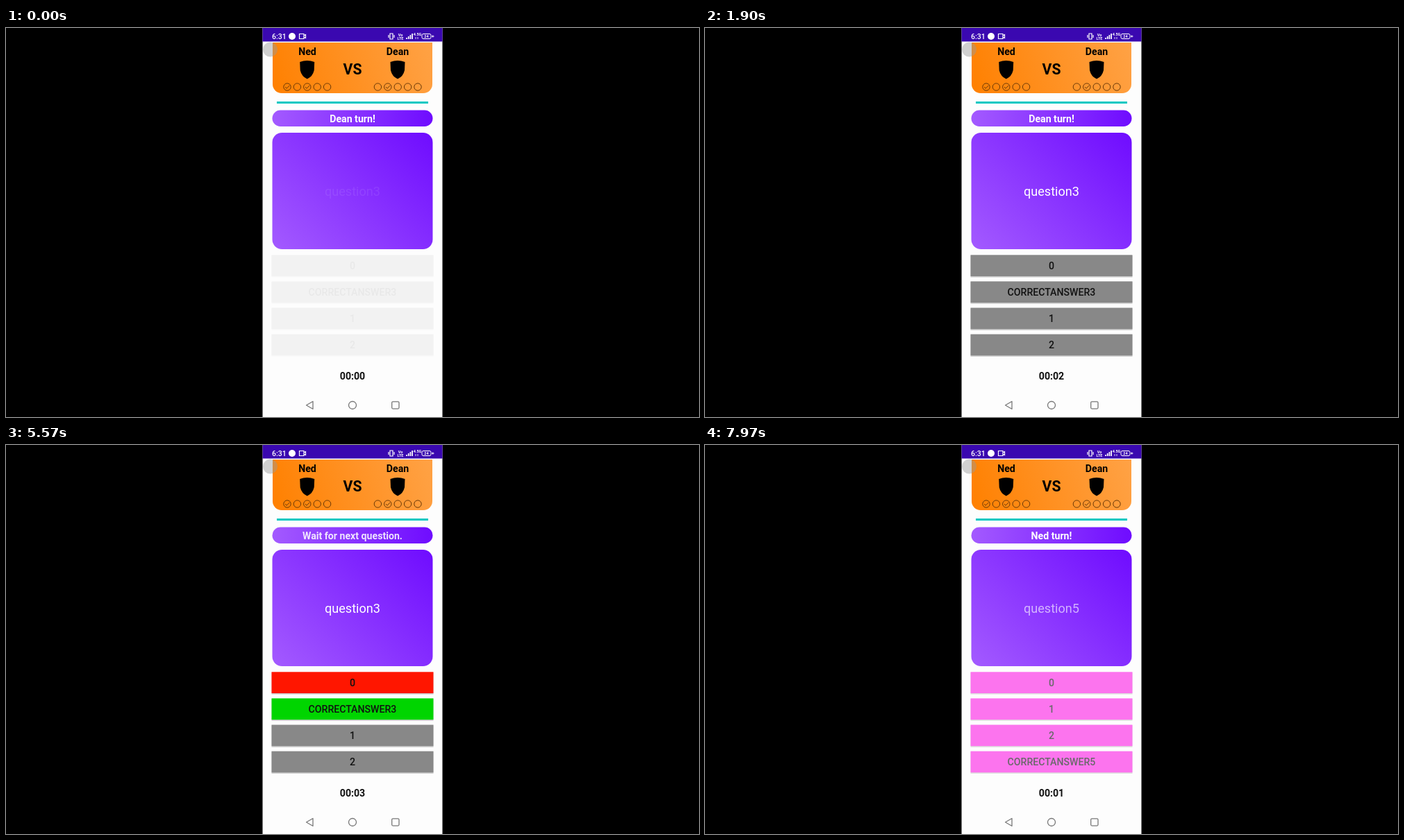
These frames come from a looping animation (998x561 px, 8000 ms). An HTML page:

```html
<!DOCTYPE html>
<html lang="en">
<head>
<meta charset="utf-8">
<title>Quiz duel</title>
<style>
  html, body { margin: 0; width: 100%; height: 100%; overflow: hidden; background: #000; }
  svg { display: block; width: 998px; height: 561px; }
  text { font-family: Roboto, sans-serif; font-size: 14.15px; text-anchor: middle; }
  .bold { font-weight: 700; }
  .tiny { font-size: 5.5px; font-weight: 700; fill: #fff; }
  .answer text { font-weight: 500; fill: #111; }
  .line { fill: none; stroke: #fff; stroke-width: 1.2; }
  .nav { fill: none; stroke: #777; stroke-width: 1.3; stroke-linejoin: round; }
  .score { fill: none; stroke: #6b3a08; stroke-width: 1; }
</style>
</head>
<body>
<svg viewBox="0 0 998 561">
  <defs>
    <linearGradient id="orange" gradientUnits="userSpaceOnUse" x1="384" y1="94" x2="614" y2="21">
      <stop stop-color="#ff8000"/><stop offset="1" stop-color="#ffa245"/>
    </linearGradient>
    <linearGradient id="pillFill">
      <stop stop-color="#a35aff"/><stop offset="1" stop-color="#6f0cff"/>
    </linearGradient>
    <linearGradient id="cardFill" gradientUnits="userSpaceOnUse" x1="400" y1="334" x2="598" y2="136">
      <stop stop-color="#a35aff"/><stop offset="1" stop-color="#6f0cff"/>
    </linearGradient>
    <path id="face" d="M-10.5-11Q0-15 10.5-11L10 1Q8 10 0 13.5Q-8 10-10 1Z"/>
  </defs>

  <rect x="369.5" width="259" height="561" fill="#fdfdfd"/>

  <!-- status bar -->
  <rect x="369.5" width="259" height="19.5" fill="#3a08b0"/>
  <text x="393.3" y="15.6" fill="#fff" style="font-size:10.5px;font-weight:500">6:31</text>
  <circle cx="412" cy="12" r="5" fill="#fff"/>
  <path class="line" d="M422.5 8.5h6.5v7h-6.5zM429 11l2.5-1.5v5L429 13"/>
  <path class="line" d="M553 8h4v8h-4zM551 10v4M559 10v4"/>
  <text class="tiny" x="568" y="11.5">Vo</text>
  <text class="tiny" x="568" y="16.5">LTE</text>
  <path class="line" style="stroke-width:1.7" d="M577 16v-2M579.7 16v-4M582.4 16v-6M585.1 16v-8"/>
  <text class="tiny" x="592.5" y="11">4.5G</text>
  <path class="line" style="stroke-width:.8" d="M590 13v3M593 13v3"/>
  <rect class="line" x="599" y="8.5" width="13" height="7" rx="2" style="stroke-width:1"/>
  <text class="tiny" x="605.5" y="14">24</text>
  <path class="line" style="stroke-width:1" d="M613 12h3.5M614.7 10.5v3"/>

  <!-- players -->
  <path d="M384 21H614V81a13 13 0 0 1-13 13H397a13 13 0 0 1-13-13Z" fill="url(#orange)"/>
  <text class="bold" x="434" y="38.5">Ned</text>
  <text class="bold" x="564" y="38.5">Dean</text>
  <use href="#face" x="433.7" y="60"/>
  <use href="#face" x="564" y="60"/>
  <text class="bold" x="499" y="66.5" style="font-size:21.2px">VS</text>
  <g id="scores"></g>
  <circle cx="380.5" cy="31" r="10.5" fill="#999" opacity=".45"/>
  <rect x="390" y="106" width="218" height="3" fill="#04c8c2"/>

  <!-- turn and question -->
  <rect x="383.5" y="118.5" width="231" height="23.5" rx="11.7" fill="url(#pillFill)"/>
  <text id="turn" class="bold" x="499" y="136" fill="#fff"></text>
  <rect x="383.5" y="151" width="231" height="168" rx="14" fill="url(#cardFill)"/>
  <text id="question" x="499" y="242.3" fill="#fff" style="font-size:18.1px"></text>
  <g id="answers"></g>
  <text id="timer" class="bold" x="499" y="507" fill="#111"></text>

  <!-- navigation bar -->
  <path class="nav" d="M442 538.5v11l-9.5-5.5z"/>
  <circle class="nav" cx="499" cy="544" r="5.5"/>
  <rect class="nav" x="555.7" y="538.8" width="10.3" height="10.3" rx="1.5"/>
</svg>
<script>
const LOOP = 8000, FADE = 1800;
const ANSWERED = 3500, WAITING = 4200, NEXT = 6930;
const rounds = [
  { start: -330, turn: 'Dean turn!', question: 'question3', fill: '#888',
    answers: ['0', 'CORRECTANSWER3', '1', '2'] },
  { start: NEXT, turn: 'Ned turn!', question: 'question5', fill: '#fc22e6',
    answers: ['0', '1', '2', 'CORRECTANSWER5'] }
];
const $ = id => document.getElementById(id);

function scoreRow(firstX, won) {
  return [0, 1, 2, 3, 4].map(i => {
    const x = firstX + i * 14.4;
    const check = won.includes(i) ? `<path d="M${x - 2.8} 85l2 2.2 4.2-4.4"/>` : '';
    return `<g class="score"><circle cx="${x}" cy="85" r="5.2"/>${check}</g>`;
  }).join('');
}
$('scores').innerHTML = scoreRow(405, [0, 2]) + scoreRow(535.4, [1]);

$('answers').innerHTML = [0, 1, 2, 3].map(i => `
  <g class="answer" transform="translate(0 ${i * 38.1})">
    <rect x="382.5" y="328" width="233" height="31.6" fill="#000" opacity=".2"/>
    <rect class="face" x="382.5" y="327.3" width="233" height="30.7"/>
    <text x="499" y="348"></text>
  </g>`).join('');
const buttons = [...document.querySelectorAll('.answer')].map(group => ({
  group, face: group.querySelector('.face'), label: group.querySelector('text')
}));

// Accelerate-decelerate fade-in
function fadeIn(t, start) {
  const x = Math.min(1, Math.max(0, (t - start) / FADE));
  return (1 - Math.cos(Math.PI * x)) / 2;
}

function draw(t) {
  const round = rounds[t < NEXT ? 0 : 1];
  const answered = t >= ANSWERED && t < NEXT;
  const waiting = t >= WAITING && t < NEXT;
  const alpha = fadeIn(t, round.start);

  $('turn').textContent = waiting ? 'Wait for next question.' : round.turn;
  $('turn').setAttribute('opacity', waiting ? fadeIn(t, WAITING) : 1);
  $('question').textContent = round.question;
  $('question').setAttribute('opacity', alpha);

  buttons.forEach(({ group, face, label }, i) => {
    const result = answered && ['#ff1600', '#00d500'][i];
    group.setAttribute('opacity', alpha);
    face.setAttribute('fill', result || round.fill);
    label.textContent = round.answers[i];
  });

  const clock = answered ? ANSWERED : t;
  const seconds = Math.floor((clock - round.start + (t < NEXT ? -20 : 0)) / 1000);
  $('timer').textContent = '00:0' + seconds;
}

function tick() {
  draw(performance.now() % LOOP);
  requestAnimationFrame(tick);
}
tick();
</script>
</body>
</html>
```
